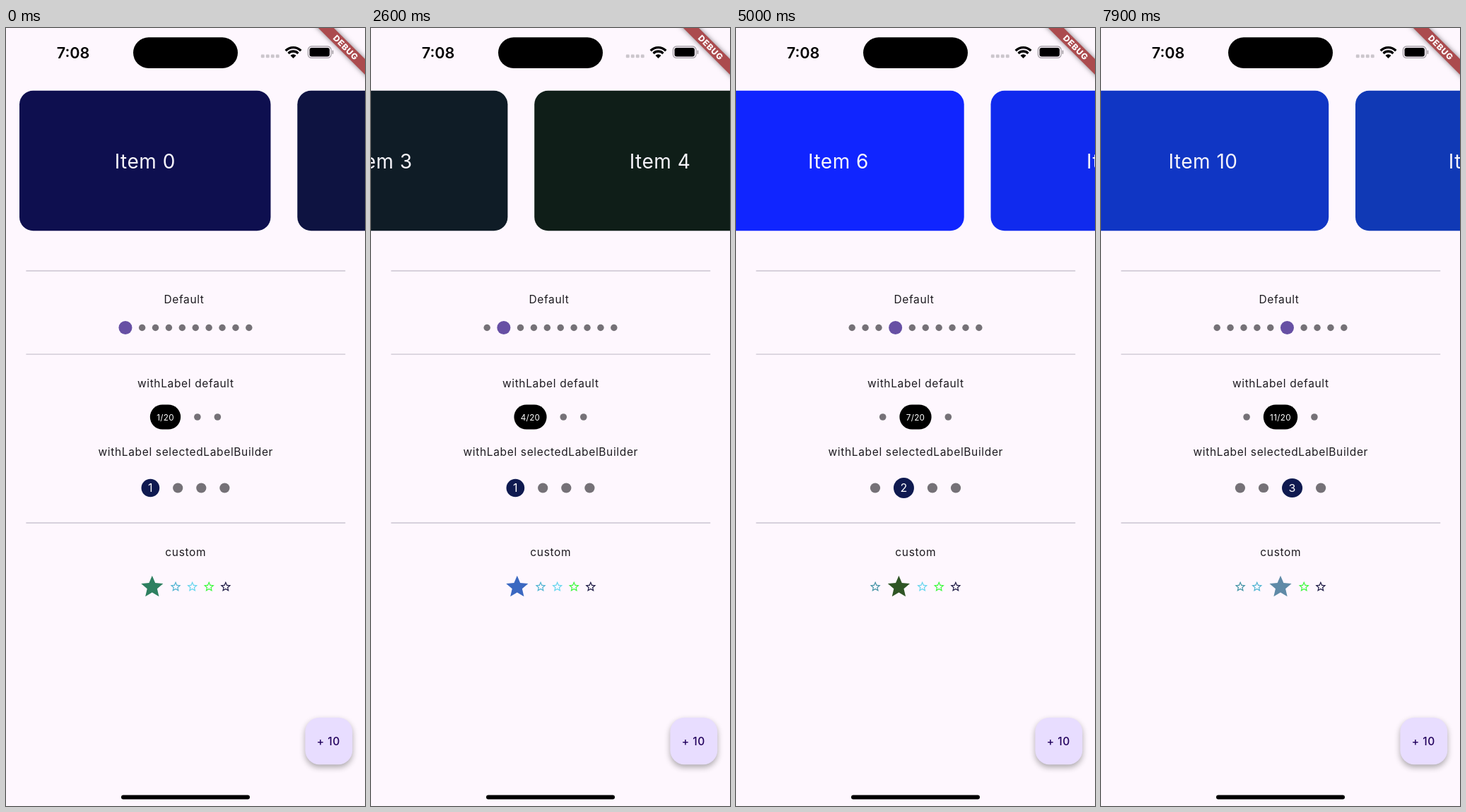
These frames come from a looping animation (508 px wide and 1102 px high, 8000 ms). An HTML page with a canvas:

```html
<!DOCTYPE html>
<html lang="en">
<head>
<meta charset="utf-8">
<title>Page indicators</title>
<style>
  html, body { margin: 0; width: 100%; height: 100%; overflow: hidden; background: #fef7fe; }
  canvas { display: block; width: 508px; height: 1102px; }
</style>
</head>
<body>
<canvas id="stage"></canvas>
<script>
const W = 508, H = 1102, LOOP = 8000, STEP = 100;
const MID = W / 2, PITCH = 393.3, CARD = 355.5, COUNT = 20;
const PAGE = (COUNT * PITCH - W) / COUNT;
const FLIP = 500;
const BG = '#fef7fe', GREY = '#757177', INK = '#1d1b20';

const canvas = document.getElementById('stage');
const ctx = canvas.getContext('2d');
const ratio = window.devicePixelRatio || 1;
canvas.width = W * ratio;
canvas.height = H * ratio;

const cardColors = ['#0e0f4f', '#0e1341', '#101932', '#0f1c26', '#0f1e18', '#11240e',
  '#1025ff', '#102aee', '#102de0', '#1033d2', '#1036c4', '#1039b5'];
const starColors = ['#2e8060', '#50cf7e', '#4a9a9c', '#3b68c1', '#39487a', '#352d33',
  '#2f5525', '#44a546', '#58f465', '#5cbf86', '#5f8aa7'];
const slotColors = ['#4393a5', '#50b4d2', '#66d6ee', '#3cfa3c', '#1e1a45'];

const star = new Path2D('M12 17.27L18.18 21l-1.64-7.03L22 9.24l-7.19-.61L12 2 9.19 8.63 2 9.24l5.46 4.73L5.82 21z');
const starBorder = new Path2D('M22 9.24l-7.19-.62L12 2 9.19 8.63 2 9.24l5.46 4.73L5.82 21 12 17.27 18.18 21l-1.63-7.03L22 9.24z' +
  'M12 15.4l-3.76 2.27 1-4.28-3.32-2.88 4.38-.38L12 6.1l1.71 4.04 4.38.38-3.32 2.88 1 4.28L12 15.4z');

// Swipes and rests of the list: [ms, offset]
const keys = [[0, 0], [600, 0], [1600, 661.6], [2600, 1361], [2700, 1361], [3600, 1903.5],
  [4100, 2010], [4200, 2010], [5000, 2411.6], [5100, 2411.6], [5700, 2800], [5800, 2800],
  [6300, 3261.2], [6400, 3261.2], [6700, 3440], [6800, 3440], [7460, 3679.5], [7900, 3985.3], [8000, 4050]];

const secant = i => (keys[i + 1][1] - keys[i][1]) / (keys[i + 1][0] - keys[i][0]);

function slope(i) {
  if (i === 0 || i === keys.length - 1) return 0;
  const a = secant(i - 1), b = secant(i);
  return a * b > 0 ? 2 * a * b / (a + b) : 0;
}

// Monotone cubic through the keys
function scrollAt(t) {
  let i = 0;
  while (i < keys.length - 2 && t >= keys[i + 1][0]) i++;
  const [t0, s0] = keys[i], [t1, s1] = keys[i + 1];
  const d = t1 - t0, u = (t - t0) / d, v = 1 - u;
  return s0 * (1 + 2 * u) * v * v + s1 * u * u * (3 - 2 * u) +
    d * u * v * (slope(i) * v - slope(i + 1) * u);
}

function timeOf(offset) {
  let lo = 0, hi = LOOP;
  for (let i = 0; i < 30; i++) {
    const mid = (lo + hi) / 2;
    if (scrollAt(mid) < offset) lo = mid; else hi = mid;
  }
  return hi;
}

const flipTimes = [1, 2].map(n => timeOf(n * 5 * PAGE));

function box(x, y, w, h, r, color) {
  ctx.fillStyle = color;
  ctx.beginPath();
  ctx.roundRect(x, y, w, h, r);
  ctx.fill();
}

function oval(x, y, rx, ry, color) {
  ctx.fillStyle = color;
  ctx.beginPath();
  ctx.ellipse(x, y, rx, ry, 0, 0, Math.PI * 2);
  ctx.fill();
}

function setFont(size, spacing = 0, weight = 400) {
  ctx.font = `${weight} ${size}px Inter, Roboto, sans-serif`;
  ctx.letterSpacing = spacing + 'px';
}

function text(str, x, y, color) {
  ctx.fillStyle = color;
  ctx.fillText(str, x, y);
}

function shadow(color, blur, dy) {
  ctx.shadowColor = color;
  ctx.shadowBlur = blur * ratio;
  ctx.shadowOffsetY = dy * ratio;
}

// Centred row: calls draw(slot, centre x, width) for every part
function row(widths, gap, draw) {
  const total = widths.reduce((a, b) => a + b, gap * (widths.length - 1));
  let x = MID - total / 2;
  widths.forEach((w, i) => {
    draw(i, x + w / 2, w);
    x += w + gap;
  });
}

const slots = (n, active, big, small) =>
  Array.from({ length: n }, (_, i) => i === active ? big : small);

function drawCards(s) {
  setFont(28, 0.5);
  cardColors.forEach((color, i) => {
    const x = 19 + i * PITCH - s;
    if (x > W || x + CARD < 0) return;
    box(x, 88.7, CARD, 198.6, 19.5, color);
    text('Item ' + i, x + CARD / 2, 199, '#f7f5fb');
  });
}

function drawLabels() {
  for (const y of [344, 462.2, 701]) box(28.4, y - 0.65, 451.8, 1.3, 0, '#cac4d0');
  setFont(15.5, 0.65);
  text('Default', MID - 2, 390, INK);
  text('withLabel default', MID + 0.3, 508.5, INK);
  text('withLabel selectedLabelBuilder', MID + 0.3, 605.5, INK);
  text('custom', MID + 0.3, 747.5, INK);
}

function drawDots(index) {
  const active = Math.floor(index / 2);
  row(slots(10, active, 19, 9.45), 9.45, (i, x, w) =>
    oval(x, 424.5, w / 2, w / 2, i === active ? '#6750a4' : GREY));
}

function drawPill(index) {
  const active = Math.floor(index / 6), label = `${index + 1}/${COUNT}`;
  setFont(11.7, 0.32);
  const wide = ctx.measureText(label).width + 18.6;
  row(slots(3, active, wide, 9.6), 18.9, (i, x, w) => {
    if (i !== active) return oval(x, 551, w / 2, w / 2, GREY);
    box(x - w / 2, 533.4, w, 35.2, 17.6, '#000');
    text(label, x, 555.6, '#fff');
  });
}

function drawFlips(index, t) {
  const active = Math.floor(index / 5), label = String(active + 1);
  setFont(16);
  const wide = ctx.measureText(label).width + 19.2;
  const age = active ? (t - flipTimes[active - 1]) / FLIP : 1;
  const squash = Math.abs(Math.cos(Math.PI * Math.min(age, 1)));
  row(slots(4, active, wide, 14.2), 18.9, (i, x, w) => {
    ctx.save();
    ctx.translate(x, 651.5);
    if (i === active || i === active - 1) ctx.scale(1, squash);
    oval(0, 0, w / 2, w / 2, i === active ? '#0f1a50' : GREY);
    if (i === active) text(label, 0, 5.8, '#fff');
    ctx.restore();
  });
}

function drawStars(index) {
  const active = Math.floor(index / 4);
  row(slots(5, active, 37.4, 18.1), 5.5, (i, x, w) => {
    ctx.save();
    ctx.translate(x, 791.3);
    ctx.scale(w / 24, w / 24);
    ctx.translate(-12, -12);
    ctx.fillStyle = i === active ? starColors[index] : slotColors[i];
    ctx.fill(i === active ? star : starBorder);
    ctx.restore();
  });
}

function drawButton() {
  ctx.save();
  shadow('rgba(0,0,0,.32)', 9, 4);
  box(423.4, 976.8, 66.8, 66.4, 20, '#e8ddff');
  ctx.restore();
  setFont(15.5, 0.5, 500);
  text('+ 10', 456.3, 1015.8, '#21005d');
}

function drawStatus() {
  setFont(21.6, 0, 600);
  text('7:08', 95, 42.6, '#000');
  box(180, 13.3, 148, 43.6, 21.8, '#000');
  for (let i = 0; i < 4; i++) box(360.8 + i * 7, 37.6, 4.9, 4.6, 1.3, '#cbc6cc');

  // Wi-Fi fan
  ctx.save();
  ctx.beginPath();
  ctx.moveTo(406.5, 43);
  ctx.lineTo(391.5, 28);
  ctx.lineTo(391.5, 20);
  ctx.lineTo(421.5, 20);
  ctx.lineTo(421.5, 28);
  ctx.closePath();
  ctx.clip();
  ctx.strokeStyle = '#000';
  ctx.lineWidth = 3.3;
  for (const r of [15, 9.6]) {
    ctx.beginPath();
    ctx.arc(406.5, 42.6, r, Math.PI, 0);
    ctx.stroke();
  }
  oval(406.5, 42.6, 5.4, 5.4, '#000');
  ctx.restore();

  ctx.strokeStyle = '#a5a0a6';
  ctx.lineWidth = 1.3;
  ctx.beginPath();
  ctx.roundRect(427.4, 26, 32.6, 16.4, 5);
  ctx.stroke();
  box(429.5, 28, 28.4, 12.4, 3.2, '#000');
  box(461.5, 31.5, 1.8, 5.4, 1, '#a5a0a6');
  box(163, 1086.6, 182, 5.8, 2.9, '#000');
}

function drawBanner() {
  ctx.save();
  ctx.translate(W, 0);
  ctx.rotate(Math.PI / 4);
  ctx.save();
  shadow('rgba(0,0,0,.5)', 7, 0);
  box(-60, 31.2, 120, 15.5, 0, '#ab4b4e');
  ctx.restore();
  setFont(11.8, 0.7, 800);
  text('DEBUG', 0.3, 43.2, '#fff');
  ctx.restore();
}

function draw(t) {
  const s = scrollAt(t), index = Math.floor(s / PAGE);
  ctx.setTransform(ratio, 0, 0, ratio, 0, 0);
  ctx.textAlign = 'center';
  ctx.fillStyle = BG;
  ctx.fillRect(0, 0, W, H);
  drawCards(s);
  drawLabels();
  drawDots(index);
  drawPill(index);
  drawFlips(index, t);
  drawStars(index);
  drawButton();
  drawStatus();
  drawBanner();
}

function tick() {
  const t = performance.now() % LOOP;
  draw(Math.floor(t / STEP) * STEP);
  requestAnimationFrame(tick);
}
tick();
</script>
</body>
</html>
```
